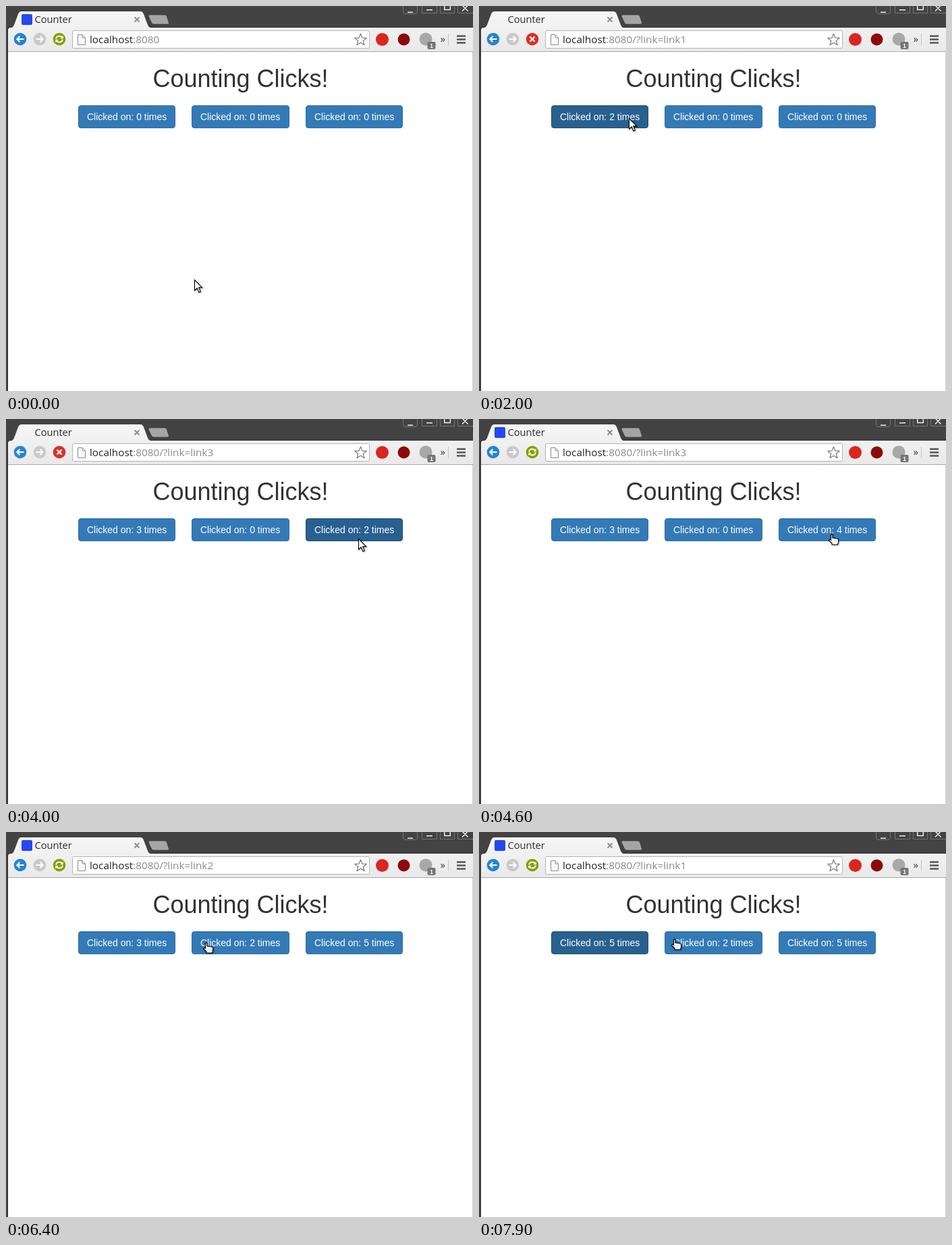
Write an HTML page that moves like this. It is 692 by 570 pixels and loops after 8000 ms.

```html
<!DOCTYPE html>
<html lang="en">
<head>
<meta charset="utf-8">
<title>Counter</title>
<style>
html, body { margin: 0; width: 100%; height: 100%; overflow: hidden; background: #fff; }
svg { display: block; }
.ui { font-family: "Open Sans", "Noto Sans", sans-serif; }
.page { font-family: "Liberation Sans", Arial, sans-serif; }
</style>
</head>
<body>
<svg width="692" height="570" viewBox="0 0 692 570">
  <defs>
    <linearGradient id="bar" x1="0" y1="8" x2="0" y2="67" gradientUnits="userSpaceOnUse">
      <stop offset="0" stop-color="#f6f6f6"/>
      <stop offset="1" stop-color="#e9e9e9"/>
    </linearGradient>
    <filter id="soft" x="-50%" y="-50%" width="200%" height="200%">
      <feDropShadow dx="1" dy="1" stdDeviation="1" flood-opacity=".35"/>
    </filter>
  </defs>

  <!-- window frame -->
  <rect width="692" height="570" fill="#444343"/>
  <path d="M2 570V36Q2 31 7 31H692V570Z" fill="#2d2d2d"/>
  <path d="M3 570V36Q3 32 7 32H692V570Z" fill="url(#bar)"/>
  <path d="M6 32.5Q10.5 32 12 28L18 12Q19.500 8 23 8H199Q202.500 8 204 12L210 28Q211.500 32 216 32.5Z" fill="url(#bar)"/>
  <path d="M213 13H235Q237.500 13 238.300 15L241.300 24.5Q242 27 239.500 27H219Q216.500 27 215.600 25L211.200 15.5Q210.500 13 213 13Z" fill="#a5a5a5" stroke="#333" stroke-width=".7"/>
  <path d="M190.500 16.500l7 7m0-7l-7 7" stroke="#8a8a8a" stroke-width="1.800"/>
  <g fill="none" stroke="#77756f">
    <path d="M588.500-2V8Q588.500 11.500 592 11.500H606Q609.500 11.500 609.500 8V-2"/>
    <path d="M616.500-2V10.500H638.500V-2M643.500-2V10.500H664.500V-2M669.500-2V10.500H692"/>
  </g>
  <path d="M595 9.200h8M623 5.700h9M649.700 0v5.500h8.600V0M676-1l8.500 8.500m0-8.500L676 7.500" fill="none" stroke="#eeeeec" stroke-width="1.500"/>
  <rect x="3" y="68" width="688" height="502" fill="#fff"/>
  <path d="M3 67.500H692" stroke="#a8a8a8"/>
  <path d="M691.500 68V570" stroke="#cfcfcf"/>

  <!-- tab and toolbar -->
  <rect id="icon" x="23" y="12" width="16" height="16" rx="2" fill="#2449ee"/>
  <text class="ui" x="42.500" y="25" font-size="14.600" fill="#2b2b2b">Counter</text>
  <circle cx="21" cy="49" r="9.300" fill="#2585d0"/>
  <circle cx="50" cy="49" r="9.300" fill="#c9c9c9"/>
  <g fill="none" stroke="#fff" stroke-width="2">
    <path d="M26.500 49H17M20.500 44.800L16.300 49L20.500 53.200"/>
    <path d="M44.500 49H54M50.500 44.800L54.700 49L50.500 53.200"/>
  </g>
  <g id="reload">
    <circle cx="79" cy="49" r="9.300" fill="#869e00"/>
    <path d="M74 48.500Q75 44.500 79 44.500Q81.500 44.500 82.800 46.300M84 49.500Q83 53.500 79 53.500Q76.500 53.500 75.200 51.700" fill="none" stroke="#fff" stroke-width="1.900"/>
    <path d="M84.700 43.800V48.300H80.200ZM73.300 54.200V49.700H77.800Z" fill="#fff"/>
  </g>
  <g id="stop">
    <circle cx="79" cy="49" r="9.300" fill="#dc3028"/>
    <path d="M75.500 45.500l7 7m0-7l-7 7" stroke="#fff" stroke-width="2.400"/>
  </g>
  <rect x="98.500" y="36.500" width="440" height="26" rx="2" fill="#fff" stroke="#b4b4b4"/>
  <path d="M106.500 42.500H113L117.500 47V57.500H106.500ZM113 42.500V47H117.500" fill="#fafafa" stroke="#8b8b8b"/>
  <text class="ui" x="124" y="55" font-size="15.300" fill="#888"><tspan fill="#222">localhost</tspan>:8080<tspan id="query"></tspan></text>
  <path id="star" fill="#fff" stroke="#777" stroke-width="1.200" stroke-linejoin="round"/>
  <circle cx="557.500" cy="49.500" r="9.500" fill="#dc2520"/>
  <circle cx="589.500" cy="49.500" r="9" fill="#8c0a0a"/>
  <circle cx="622" cy="49" r="9.500" fill="#a8a8a8"/>
  <rect x="624.500" y="53" width="12" height="11" rx="2" fill="#757575"/>
  <text class="page" x="630.500" y="62" font-size="9" font-weight="bold" text-anchor="middle" fill="#fff">1</text>
  <text class="ui" x="643.500" y="54" font-size="15" fill="#333">»</text>
  <path d="M655.500 41V58" stroke="#c4c4c4"/>
  <path d="M668 44.500h13M668 49.500h13M668 54.500h13" stroke="#555" stroke-width="2.600"/>

  <!-- page -->
  <text class="page" x="347.500" y="120" font-size="36" text-anchor="middle" fill="#333">Counting Clicks!</text>
  <g id="buttons" class="page" font-size="14"></g>

  <g id="arrow" filter="url(#soft)">
    <path d="M.5.500V16.200L4.200 12.800L6.900 19L9.300 18L6.700 11.900H11.700Z" fill="#fff" stroke="#000" stroke-width="1.100"/>
  </g>
  <g id="hand" filter="url(#soft)">
    <path d="M3.500 1.500Q4.800.300 6 1.500V6L13 7Q14.600 7.400 14.600 9V12.500L13.500 16H5V14L.8 10.300Q.4 8.300 2.200 8.300L3.500 9.300Z" fill="#fff" stroke="#000" stroke-width="1.200"/>
    <path d="M7 9.500v3.500M9.200 9.500v3.500M11.400 9.500v3.500" stroke="#999" stroke-width=".8" stroke-dasharray="1 1"/>
  </g>
</svg>
<script>
const LOOP = 8000, TICK = 100;
const TOP = 147, HEIGHT = 34;

// runs of clicks on one button: time per click, then when each is pressed
const clicks = [
  { btn: 0, span: 300, at: [800, 1300, 1900] },
  { btn: 2, span: 300, at: [2800, 3300, 3900, 4300, 4800] },
  { btn: 1, span: 400, at: [5400, 6000] },
  { btn: 0, span: 200, at: [7400, 7600] }
].flatMap(({ btn, span, at }) =>
  at.map(press => ({ btn, press, load: press + span / 3, done: press + span })));

// pointer glides
const home = { x: 279, y: 405 };
const moves = [
  { from: 0, to: 600, x: 222, y: 166 },
  { from: 2200, to: 2600, x: 522, y: 177 },
  { from: 4300, to: 4600, x: 522, y: 171 },
  { from: 5000, to: 5100, x: 296, y: 164 },
  { from: 6500, to: 7400, x: 215, y: 168 },
  { from: 7800, to: 7900, x: 289, y: 159 }
];

const skins = {
  plain: ['#337ab7', '#2e6da4'],
  hover: ['#286090', '#204d74'],
  active: ['#204d74', '#122b40']
};

const $ = id => document.getElementById(id);
const show = (id, on) => $(id).setAttribute('visibility', on ? 'visible' : 'hidden');
const place = (id, x, y) => $(id).setAttribute('transform', `translate(${x} ${y})`);
const ease = k => k * k * (3 - 2 * k);

function make(tag, attrs) {
  const el = document.createElementNS('http://www.w3.org/2000/svg', tag);
  for (const k in attrs) el.setAttribute(k, attrs[k]);
  return $('buttons').appendChild(el);
}

const buttons = [0, 1, 2].map(i => {
  const x = 107.1 + i * 168.3;
  const left = Math.round(x), right = Math.round(x + 144.26);
  return {
    left, right,
    box: make('rect', { x: left + .5, y: TOP + .5, width: right - left - 1, height: HEIGHT - 1, rx: 3.5 }),
    label: make('text', { x: Math.round(x + 13), y: 169, fill: '#fff' })
  };
});

$('star').setAttribute('d', 'M' + Array.from({ length: 10 }, (_, i) => {
  const r = i % 2 ? 4 : 9.3, a = (i / 5 - .5) * Math.PI;
  return (525.5 + r * Math.cos(a)).toFixed(1) + ' ' + (50.3 + r * Math.sin(a)).toFixed(1);
}).join('L') + 'Z');

function pointer(t) {
  let { x, y } = home;
  for (const m of moves) {
    const k = ease(Math.min(1, Math.max(0, (t - m.from) / (m.to - m.from))));
    x += (m.x - x) * k;
    y += (m.y - y) * k;
  }
  return { x: Math.round(x), y: Math.round(y) };
}

const over = ({ x, y }) => y >= TOP && y <= TOP + HEIGHT
  ? buttons.findIndex(b => x >= b.left && x <= b.right) : -1;

function draw(t) {
  const pos = pointer(t);
  const last = clicks.filter(c => t >= c.press).pop();
  const done = clicks.filter(c => t >= c.done);
  const busy = !!last && t < last.done;
  const loading = busy && t >= last.load;

  // a fresh page shows no hover until the pointer moves; hover trails by one tick
  const rest = last && pointer(last.done);
  const moved = !rest || rest.x !== pos.x || rest.y !== pos.y;
  const hovered = moved ? over(pointer(t - TICK)) : -1;

  buttons.forEach(({ box, label }, i) => {
    let skin = 'plain';
    if (busy) {
      if (last.btn === i) skin = loading ? 'hover' : 'active';
    } else if (hovered === i) skin = 'hover';
    box.setAttribute('fill', skins[skin][0]);
    box.setAttribute('stroke', skins[skin][1]);
    label.textContent = `Clicked on: ${done.filter(c => c.btn === i).length} times`;
  });

  $('query').textContent = done.length ? '/?link=link' + (done[done.length - 1].btn + 1) : '';
  show('icon', !loading);
  show('reload', !loading);
  show('stop', loading);

  const hand = !loading && over(pos) >= 0;
  show('hand', hand);
  show('arrow', !hand);
  place('arrow', pos.x, pos.y);
  place('hand', pos.x - 4, pos.y - 1);
}

const start = performance.now();
function frame() {
  const t = (performance.now() - start) % LOOP;
  draw(Math.floor(t / TICK) * TICK);
  requestAnimationFrame(frame);
}
frame();
</script>
</body>
</html>
```
